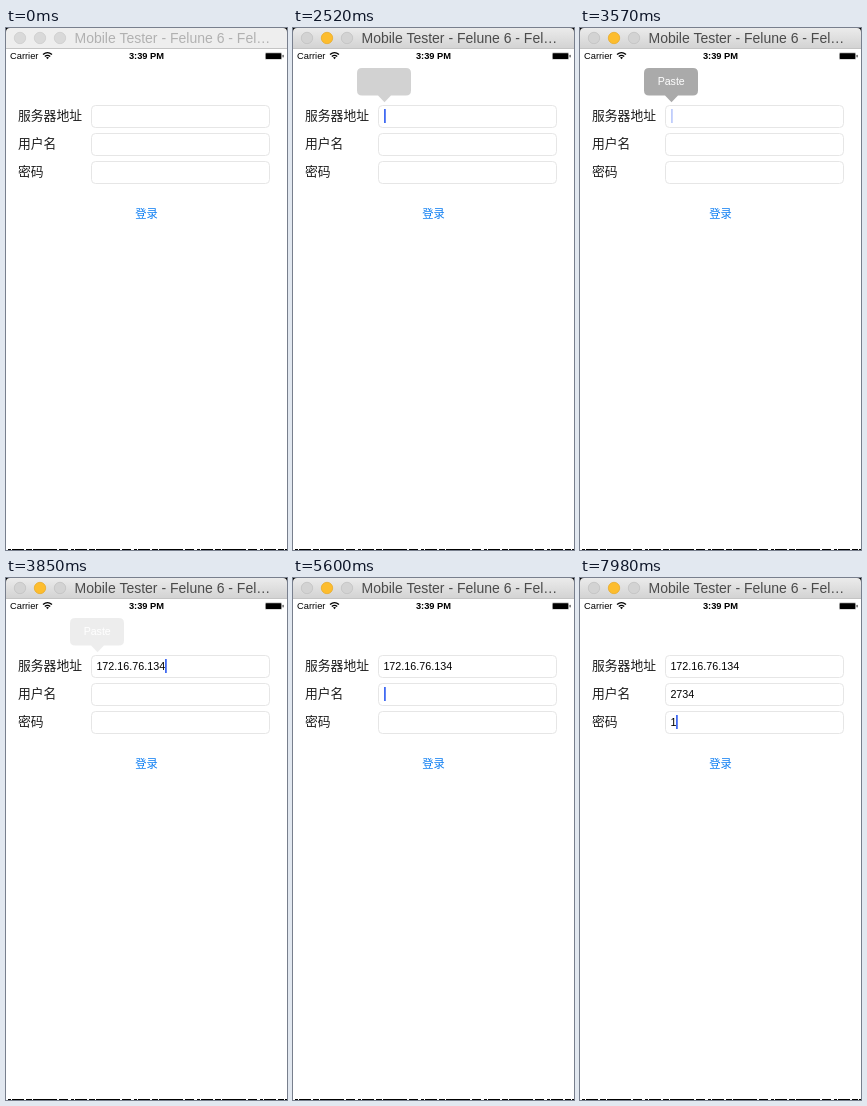
Recreate the animation shown at these times as an HTML page. Size 281 by 522 pixels, loop 8 s.

```html
<!DOCTYPE html>
<html lang="zh">
<head>
<meta charset="utf-8">
<title>Login form</title>
<style>
  html, body { margin: 0; width: 100%; height: 100%; overflow: hidden; background: #fff; }
  svg { display: block; width: 281px; height: 522px; font-family: "Liberation Sans", Arial, sans-serif; }
  .cjk { font-family: "Noto Sans CJK SC", "Noto Sans CJK", sans-serif; }
  .label { font-size: 12.8px; font-weight: 300; fill: #1c1c1c; }
  .input { font-size: 10.75px; }
  .status { font-size: 9.3px; }
  .field { fill: #fff; stroke: #e6e6e6; }
  .light { fill: #d3d3d3; stroke: #c2c2c2; stroke-width: .8; }
  .bar { fill: url(#active); }
  .title { font-size: 14px; fill: #4b4b4b; }
  .minimize { fill: #fdbd2e; stroke: #e9ab2a; }
  .inactive .bar { fill: #eeeeee; }
  .inactive .title { fill: #b1b1b1; }
  .inactive .light { fill: #d9d9d9; stroke: #cdcdcd; }
</style>
</head>
<body>
<svg viewBox="0 0 281 522">
  <defs>
    <linearGradient id="active" x2="0" y2="1">
      <stop offset="0" stop-color="#ebebeb"/>
      <stop offset="1" stop-color="#d2d2d2"/>
    </linearGradient>
  </defs>

  <g id="window">
    <rect width="281" height="8"/>
    <path class="bar" d="M0 21V4Q0 0 4 0H277Q281 0 281 4V21Z"/>
    <path d="M0 20.5H281" stroke="#c4c4c4"/>
    <circle class="light" cx="14" cy="10" r="5.7"/>
    <circle class="light minimize" cx="34" cy="10" r="5.7"/>
    <circle class="light" cx="54" cy="10" r="5.7"/>
    <text class="title" x="68.5" y="15">Mobile Tester - Felune 6 - Fel…</text>
  </g>

  <g class="status">
    <text x="4" y="31.3">Carrier</text>
    <text x="140.5" y="31.3" text-anchor="middle" font-weight="bold">3:39 PM</text>
  </g>
  <g fill="none" stroke="#000" stroke-width="1.3">
    <path d="M37 26.6Q41.5 22.6 46 26.6M38.8 28.6Q41.5 26.2 44.2 28.6"/>
    <path d="M40 29.6Q41.5 28.4 43 29.6L41.5 31.3Z" fill="#000" stroke="none"/>
  </g>
  <rect x="259" y="24.6" width="17" height="7" rx="1.2" fill="#b8b8b8"/>
  <rect x="259.8" y="25.3" width="15.4" height="5.6" rx=".6"/>
  <rect x="276.5" y="26.8" width="1.2" height="2.6" rx=".6" fill="#444"/>

  <g id="form"></g>
  <text class="cjk" x="140.6" y="189.8" text-anchor="middle" font-size="11.25" fill="#0a7cf2">登录</text>

  <rect id="caret" width="1.8" height="14" fill="#426bf2"/>
  <g id="popup">
    <path d="M69 40H113Q118 40 118 45V62.5Q118 67.5 113 67.5H98L91.5 74.2L85 67.5H69Q64 67.5 64 62.5V45Q64 40 69 40Z" fill="#222"/>
    <text id="paste" x="91.2" y="57.4" text-anchor="middle" font-size="10.6" fill="#fff">Paste</text>
  </g>

  <path d="M2 521.5H281" stroke="#000" stroke-dasharray="3 1 12 2 6 1 24 2 9 3"/>
</svg>

<script>
const LOOP = 8000, STEP = 70, TEXT_X = 90.4;
const byId = id => document.getElementById(id);

const rows = ["服务器地址", "用户名", "密码"].map((label, i) => {
  const top = 77.5 + 28 * i;
  byId("form").insertAdjacentHTML("beforeend",
    `<text class="cjk label" x="12" y="${top + 14.6}">${label}</text>
     <rect class="field" x="85.5" y="${top}" width="178" height="22" rx="4"/>
     <text class="input" x="${TEXT_X}" y="${top + 14.4}"></text>`);
  return { top, input: byId("form").lastElementChild };
});

// Each edit: time, row, characters shown.
const edits = [
  [0, 0, ""], [3710, 0, "172.16.76.134"],
  [5600, 1, ""], [6090, 1, "2"], [6300, 1, "27"], [6440, 1, "273"], [6510, 1, "2734"],
  [7560, 2, ""], [7980, 2, "1"]
];

// Each fade: start time, number of steps, from, to.
const caretFades = [
  [1540, 1, 0, 1], [2100, 3, 1, 0], [2310, 1, 0, 1], [3080, 3, 1, 0],
  [3570, 3, 0, 1], [4270, 4, 1, 0], [4760, 3, 0, 1], [5320, 4, 1, 0],
  [5600, 1, 0, 1], [7140, 3, 1, 0], [7560, 1, 0, 1]
];
const popupFades = [[2520, 1, 0, .2], [2590, 2, .2, 1], [3570, 1, 1, .38], [3640, 5, .38, 0]];

function opacityAt(fades, t) {
  const fade = fades.findLast(([start]) => start <= t);
  if (!fade) return 0;
  const [start, steps, from, to] = fade;
  return from + (to - from) * Math.min(1, ((t - start) / STEP + 1) / steps);
}

function draw(now) {
  const t = Math.floor((now % LOOP) / STEP) * STEP;
  byId("window").classList.toggle("inactive", t < 1190);

  const done = edits.filter(([time]) => time <= t);
  rows.forEach(({ input }, i) => {
    const edit = done.findLast(([, row]) => row === i);
    input.textContent = edit ? edit[2] : "";
  });

  // The caret sits on whole pixels.
  const { top, input } = rows[done.at(-1)[1]];
  const textWidth = input.textContent ? input.getComputedTextLength() : 0;
  const caret = byId("caret");
  caret.setAttribute("x", Math.floor(TEXT_X + textWidth + .61));
  caret.setAttribute("y", top + 3.5);
  caret.setAttribute("opacity", opacityAt(caretFades, t));

  byId("popup").setAttribute("opacity", opacityAt(popupFades, t));
  byId("paste").setAttribute("opacity", t < 2590 ? 0 : 1);
}

const begin = performance.now();
function tick() {
  draw(performance.now() - begin);
  requestAnimationFrame(tick);
}
tick();
</script>
</body>
</html>
```
